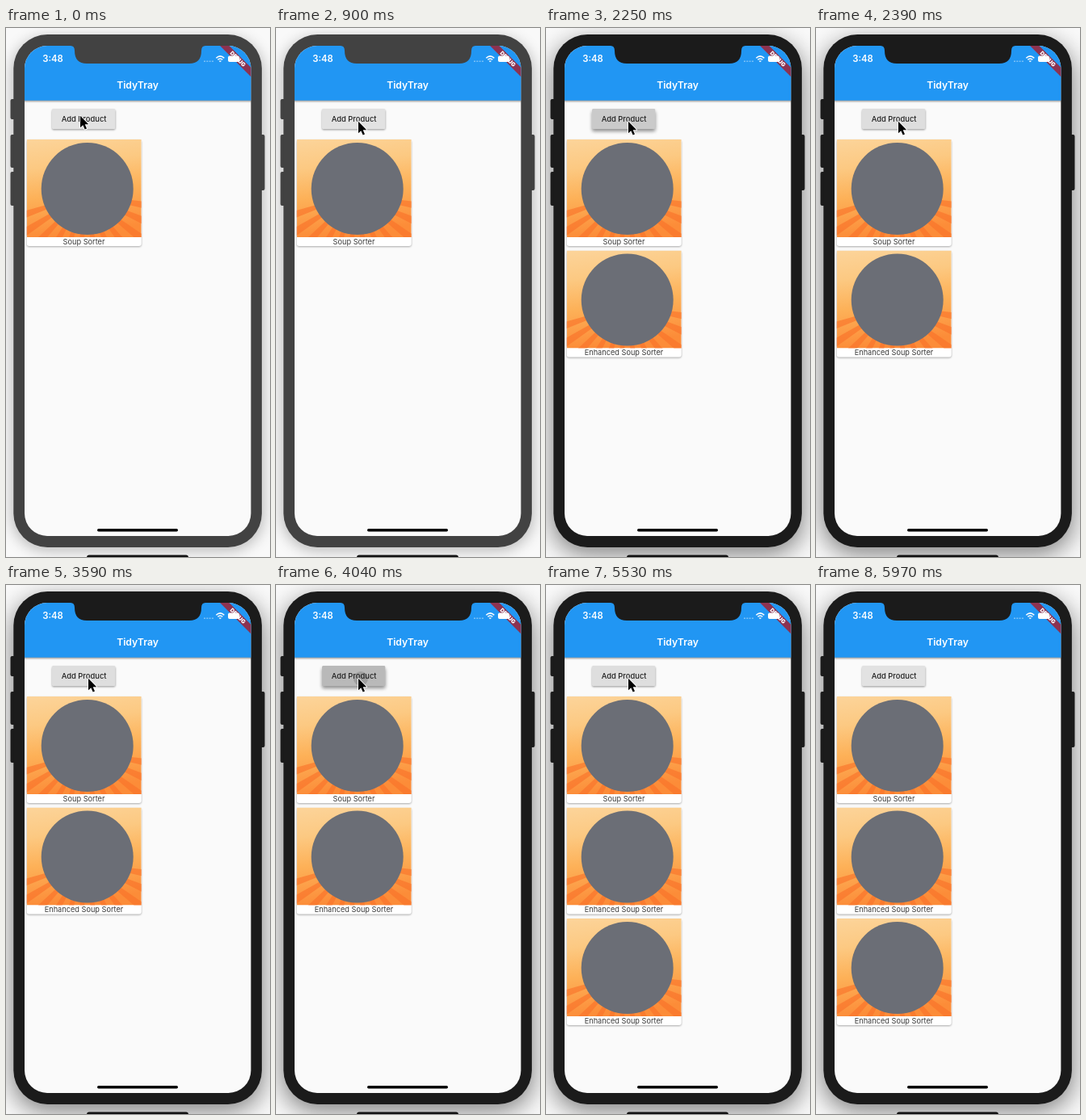
Animation of 327x655 px, one loop 6.57 s. Source, as an HTML page:

```html
<!DOCTYPE html>
<html lang="en">
<head>
<meta charset="utf-8">
<title>Product list</title>
<style>
  html, body { margin: 0; width: 100%; height: 100%; overflow: hidden; background: #f9f9f9; }
  svg { display: block; width: 327px; height: 655px; }
  text { font-family: Inter, Roboto, sans-serif; text-anchor: middle; }
  .label { font-size: 9.2px; fill: #3a3a3a; }
</style>
</head>
<body>
<svg viewBox="0 0 327 655">
  <defs>
    <filter id="halo" x="-30%" y="-30%" width="160%" height="160%"><feGaussianBlur id="blur"/></filter>
    <filter id="soft" x="-20%" y="-40%" width="140%" height="200%"><feGaussianBlur stdDeviation="1"/></filter>
    <filter id="lift" x="-20%" y="-60%" width="140%" height="240%"><feGaussianBlur stdDeviation="2.2"/></filter>
    <linearGradient id="sun" x2="0.15" y2="1">
      <stop offset="0" stop-color="#fcd49a"/>
      <stop offset=".3" stop-color="#fcc982"/>
      <stop offset=".6" stop-color="#fdb158"/>
      <stop offset="1" stop-color="#fc8c38"/>
    </linearGradient>
    <clipPath id="screen"><rect x="23" y="22" width="280.4" height="607" rx="28"/></clipPath>
    <clipPath id="photo"><rect width="142" height="121"/></clipPath>
    <clipPath id="face"><rect x="57" y="100" width="78.5" height="25" rx="1.5"/></clipPath>
    <g id="card">
      <rect y="1" width="142" height="132" rx="3" opacity=".32" filter="url(#soft)"/>
      <rect width="142" height="132" rx="3" fill="#fff"/>
      <g clip-path="url(#photo)">
        <rect width="142" height="121" fill="url(#sun)"/>
        <path id="rays" fill="#fb7028" opacity=".6"/>
        <circle cx="75" cy="61" r="57" fill="#6b6e76"/>
      </g>
    </g>
  </defs>

  <rect id="glow" x="7" width="312" height="635" rx="44" filter="url(#halo)"/>
  <rect x="100" y="652.5" width="126" height="8" rx="3" fill="#111"/>
  <g id="body">
    <path d="M10 88H7.5q-2 0-2 2v21q0 2 2 2H10zM10 132H7.5q-2 0-2 2v37q0 2 2 2H10zM10 178H7.5q-2 0-2 2v38q0 2 2 2H10zM316 132h2.5q2 0 2 2v65q0 2-2 2H316z"/>
    <rect x="9.3" y="8" width="307.6" height="635" rx="42"/>
  </g>

  <g clip-path="url(#screen)">
    <rect x="23" y="22" width="281" height="607" fill="#fafafa"/>
    <rect x="20" y="60" width="286" height="31" opacity=".4" filter="url(#soft)"/>
    <rect x="23" y="22" width="281" height="67.7" fill="#2196f3"/>
    <text x="163" y="75" font-size="12.2" font-weight="600" fill="#fff">TidyTray</text>
    <g transform="translate(303.4 22) rotate(45)">
      <rect x="-40" y="19" width="80" height="8.1" fill="#8c3250"/>
      <text y="25.5" font-size="6.9" font-weight="900" fill="#fff">DEBUG</text>
    </g>
    <text x="58" y="42" font-size="11.3" font-weight="600" fill="#fff">3:48</text>
    <path d="M245 41.2h12" stroke="#fff" stroke-width="1.5" stroke-dasharray="2 1.3" opacity=".4"/>
    <g fill="none" stroke="#fff" stroke-width="1.5">
      <path d="M260.3 37.2q5-4.6 10 0M262.3 39.3q3-2.7 6 0"/>
      <path d="M264 40.7h2.6l-1.3 1.4z" fill="#fff" stroke-width=".5"/>
    </g>
    <rect x="275" y="34.5" width="14" height="7.5" rx="2" fill="#fff"/>
    <path d="M290 36.8v3" stroke="#fff" opacity=".6"/>

    <rect id="shade" x="57" width="78.5" height="25" rx="2"/>
    <g clip-path="url(#face)">
      <rect id="button" x="57" y="100" width="78.5" height="25"/>
      <circle id="ripple" cx="105" cy="116" opacity=".14"/>
    </g>
    <text x="96.6" y="115.5" font-size="9.4" font-weight="500" fill="#222">Add Product</text>
    <g id="list"></g>
    <rect x="113" y="620" width="100" height="3.4" rx="1.7"/>
  </g>
  <path id="notch" d="M80 21h167v1q-5 0-5 6 0 16-15 16H100Q85 44 85 28q0-6-5-6z"/>

  <path id="cursor" d="M1 .8V15.2L4.3 12.2 6.7 17.6 9 16.6 6.7 11.3H11.2Z" stroke="#fff" stroke-width="1.8" stroke-linejoin="round" paint-order="stroke"/>
</svg>
<script>
const LOOP = 6570;
const $ = id => document.getElementById(id);
const set = (id, attrs) => {
  for (const key in attrs) $(id).setAttribute(key, attrs[key]);
};

// sun rays fanning out over the lower half of the picture
let rays = '';
const ray = a => `${71 + 130 * Math.cos(a)} ${68 + 130 * Math.sin(a)}`;
for (let a = 0.12; a < 3; a += 0.24) rays += `M71 68L${ray(a)} ${ray(a + 0.11)}Z`;
set('rays', { d: rays });

['Soup Sorter', 'Enhanced Soup Sorter', 'Enhanced Soup Sorter'].forEach((name, i) => {
  $('list').innerHTML += `<g transform="translate(25.7 ${138 + i * 137.5})">
    <use href="#card"/><text class="label" x="70.8" y="129.8">${name}</text></g>`;
});
const cards = [...$('list').children];

// [start, x, y]
const moves = [
  [0, 91, 108], [150, 93, 110], [600, 95, 113], [750, 99, 114], [900, 101, 115],
  [5830, 216, 457], [5970, -50, -50]
];
// [start, fill, raised, ripple radius]
const presses = [
  [0, '#e2e2e2', 0, 0], [2100, '#d2d2d2', 1, 0], [2250, '#cacaca', 1, 0], [2390, '#dedede', 0, 0],
  [4040, '#b9b9b9', 1, 9], [4190, '#cacaca', 1, 0], [4340, '#dedede', 0, 0], [5830, '#e2e2e2', 0, 0]
];
const cardStarts = [0, 2250, 4190];
const at = (steps, t) => steps.filter(s => s[0] <= t).pop();

function draw(now) {
  const t = now % LOOP;
  const active = t >= 2100;
  const shell = active ? '#1b1b1b' : '#424242';
  set('body', { fill: shell });
  set('notch', { fill: shell });
  set('blur', { stdDeviation: active ? 15 : 9 });
  set('glow', { y: active ? 17 : 12, opacity: active ? 0.48 : 0.26 });

  const [, x, y] = at(moves, t);
  set('cursor', { transform: `translate(${x} ${y})` });

  const [, fill, raised, radius] = at(presses, t);
  set('button', { fill });
  set('ripple', { r: radius });
  set('shade', {
    y: raised ? 103 : 101.3,
    opacity: raised ? 0.42 : 0.36,
    filter: `url(#${raised ? 'lift' : 'soft'})`
  });

  cards.forEach((card, i) => card.setAttribute('visibility', t >= cardStarts[i] ? 'visible' : 'hidden'));
  requestAnimationFrame(draw);
}
draw(performance.now());
</script>
</body>
</html>
```
